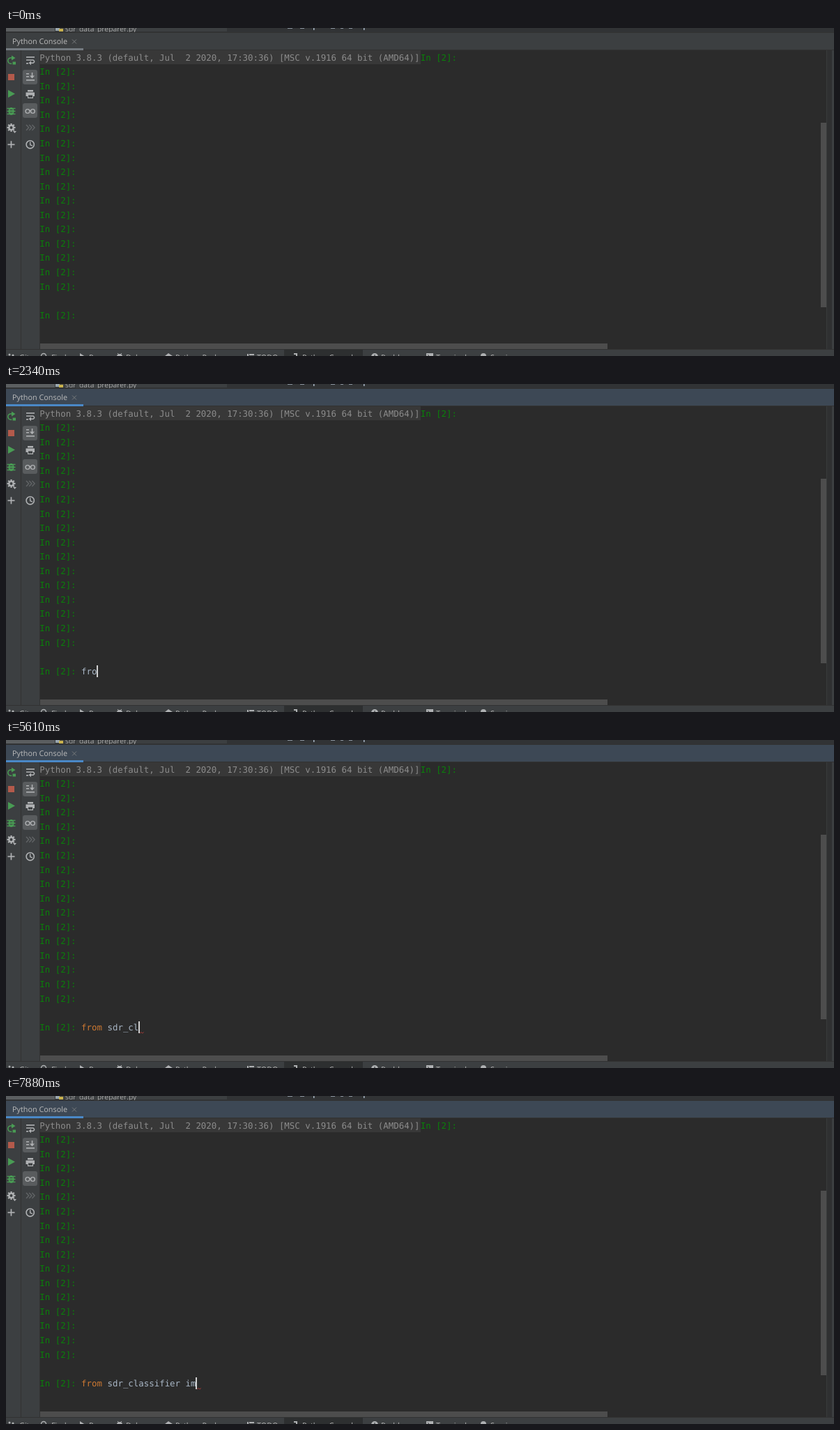
Animation, 1188 px wide and 471 px high, one loop 8 s. Source, as an HTML page with a canvas:

```html
<!DOCTYPE html>
<html lang="en">
<head>
<meta charset="utf-8">
<title>Python Console</title>
<style>
  html, body { margin: 0; width: 100%; height: 100%; overflow: hidden; background: #2b2b2b; }
  canvas { display: block; }
</style>
</head>
<body>
<canvas id="stage" width="1188" height="471"></canvas>
<script>
const ctx = document.getElementById('stage').getContext('2d');
const LOOP = 8000;
const LEFT = 48.3, CHAR = 7.475, ROW = 20.56, BASE = 46.6;
const MONO = '12.417px "DejaVu Sans Mono", monospace';
const UI = '"Open Sans", sans-serif';
const PANEL = '#3c3f41', CONSOLE = '#2b2b2b', LINE = '#323232', ICON = '#afb1b3';
const GREEN = '#499c54', PROMPT = '#0a800a', KEYWORD = '#cc7832', PLAIN = '#a9b7c6';

const COMMAND = 'from sdr_classifier im';
// Time at which each character of the command is typed
const KEYS = [2070, 2270, 2340, 2540, 2610, 3680, 3750, 4020, 4350, 4880, 5610,
  5940, 6140, 6340, 6940, 7070, 7200, 7270, 7420, 7550, 7680, 7880];
// Mouse positions: time, x, y
const MOUSE = [[200, 965, 454], [270, 880, 433], [340, 775, 406], [410, 709, 386],
  [480, 689, 380], [680, 689, 384], [740, 689, 391], [810, 688, 398],
  [870, 688, 403.5], [1340, 688, 404.5]];

function rect(x, y, w, h, color) {
  ctx.fillStyle = color;
  ctx.fillRect(x, y, w, h);
}

function text(str, x, y, color, font) {
  ctx.font = font;
  ctx.fillStyle = color;
  ctx.fillText(str, x, y);
}

function poly(points, color, width = 0) {
  ctx.beginPath();
  points.forEach(([x, y]) => ctx.lineTo(x, y));
  if (width) {
    ctx.strokeStyle = color;
    ctx.lineWidth = width;
    ctx.stroke();
  } else {
    ctx.fillStyle = color;
    ctx.fill();
  }
}

function arc(x, y, r, color, width = 0, from = 0, to = 2 * Math.PI) {
  ctx.beginPath();
  ctx.arc(x, y, r, from, to);
  ctx.strokeStyle = ctx.fillStyle = color;
  ctx.lineWidth = width;
  if (width) ctx.stroke(); else ctx.fill();
}

const cell = n => LEFT + CHAR * n;
const mono = (str, col, row, color) =>
  text(str, cell(col), Math.round(BASE + ROW * row), color, MONO);

function drawEditorEdge() {
  rect(0, 0, 1188, 7, '#313335');
  rect(0, 0, 317, 5, PANEL);
  rect(0, 0, 70, 5, '#5b5e60');
  ctx.save();
  ctx.beginPath();
  ctx.rect(0, 0, 1188, 6);
  ctx.clip();
  rect(71, 0, 6, 4, '#9aa7b0');
  rect(76, 1, 6, 4, '#c9b24e');
  text('sdr_data_preparer.py', 85, 5, '#a8a8a8', '10.3px ' + UI);
  ctx.restore();
  [[404, 7], [422, 6], [466, 6], [480, 4], [492, 5]].forEach(([x, w]) => rect(x, 0, w, 1, '#8b949e'));
  rect(441, 0, 1.5, 3, PLAIN);
  rect(513, 0, 1.5, 3, PLAIN);
  rect(0, 6, 1188, 1, LINE);
}

function drawHeader(active) {
  rect(0, 7, 1188, 24, active ? '#3d4855' : PANEL);
  rect(0, 31, 1188, 1, LINE);
  rect(0, 29, 111, 3, active ? '#4a88c7' : '#747a80');
  text('Python Console', 9, 23, '#bbbbbb', '10.83px ' + UI);
  poly([[95, 16.5], [101, 22.5]], '#777a7c', 1);
  poly([[101, 16.5], [95, 22.5]], '#777a7c', 1);
}

function drawRunIcons() {
  arc(7, 47, 4.2, GREEN, 1.6, 1.3, 5);
  poly([[8, 39.5], [13.5, 43], [8, 46.5]], GREEN);
  rect(9.5, 48.5, 4.5, 4, GREEN);
  rect(3, 66, 9, 9, '#b35a4b');
  poly([[3, 89], [13, 94.5], [3, 100]], GREEN);

  [115.5, 119.5, 123.5].forEach(y => rect(1.5, y - 0.7, 12, 1.4, GREEN));
  ctx.beginPath();
  ctx.ellipse(7.5, 119.5, 4, 5.5, 0, 0, 7);
  ctx.fillStyle = GREEN;
  ctx.fill();
  rect(5.5, 117, 4, 1, PANEL);
  rect(5.5, 120.5, 4, 1, PANEL);

  for (let i = 0; i < 8; i++) {
    const a = i * Math.PI / 4, c = Math.cos(a), s = Math.sin(a);
    poly([[7.5 + 3 * c, 143 + 3 * s], [7.5 + 6 * c, 143 + 6 * s]], ICON, 2.2);
  }
  arc(7.5, 143, 3.2, ICON, 2.4);
  poly([[10, 148], [15, 148], [12.5, 151]], ICON);

  rect(2.5, 166.5, 10, 1.7, ICON);
  rect(6.6, 162.3, 1.7, 10, ICON);
}

function drawConsoleIcons() {
  for (const y of [60, 108]) {
    ctx.beginPath();
    ctx.roundRect(24, y, 21, 21, 3);
    ctx.fillStyle = '#595c5e';
    ctx.fill();
  }
  rect(29, 41, 12, 1.6, ICON);
  poly([[29, 46], [39, 46], [40.5, 47.5], [40.5, 49], [39, 50.3], [35, 50.3]], ICON, 1.5);
  poly([[36, 47.2], [36, 53.2], [32.5, 50.2]], ICON);
  rect(29, 50, 3, 1.6, ICON);

  rect(29, 65, 4, 1.5, ICON);
  rect(29, 69, 4, 1.5, ICON);
  rect(29, 74, 12, 1.6, ICON);
  rect(36.8, 64, 1.5, 6, ICON);
  poly([[34, 68.5], [41, 68.5], [37.5, 72.3]], ICON);

  rect(31, 89, 8, 2.5, ICON);
  rect(28.5, 92.5, 12.5, 5.5, ICON);
  rect(31, 95.5, 8, 5.5, ICON);
  rect(32, 96.5, 6, 3.2, PANEL);

  arc(31, 119.5, 2.9, ICON, 1.4);
  arc(38.4, 119.5, 2.9, ICON, 1.4);
  rect(33.5, 118, 2.5, 1.2, ICON);

  [29, 33.2, 37.4].forEach(x =>
    poly([[x, 139], [x + 3.7, 143], [x, 147]], '#606365', 1.5));

  arc(34.7, 167.3, 5.6, ICON, 1.6);
  poly([[34.7, 163.5], [34.7, 167.8], [37.8, 169]], ICON, 1.4);
}

function drawSideBars() {
  rect(0, 32, 48, 429, PANEL);
  rect(21, 32, 1, 429, LINE);
  rect(48, 32, 1, 429, LINE);
  drawRunIcons();
  drawConsoleIcons();
}

function drawBottomBar() {
  rect(0, 461, 1188, 10, PANEL);
  rect(0, 461, 1188, 1, LINE);
  rect(399, 462, 113, 9, '#2d2f30');
  const tabs = [['Git', 19], ['Find', 65], ['Run', 119], ['Debug', 172],
    ['Python Packages', 243], ['TODO', 360], ['Python Console', 425],
    ['Problems', 538], ['Terminal', 617], ['Services', 695]];
  for (const [label, x] of tabs) text(label, x, 477, '#bbbbbb', '10.83px ' + UI);

  arc(5, 469, 1.5, ICON);
  arc(10, 470, 1.5, ICON);
  arc(54, 471, 3.5, ICON, 1.5);
  poly([[106, 467], [113, 471.5], [106, 476]], ICON);
  arc(163, 472, 4, ICON);
  poly([[160, 467], [163, 470], [166, 467]], ICON, 1);
  poly([[228, 471], [233, 467], [239, 471]], ICON);
  rect(346, 468, 2, 3, ICON);
  rect(349, 468, 7, 2, ICON);
  poly([[413, 468], [417, 468], [417, 471]], ICON, 2);
  arc(529, 472, 5, ICON);
  rect(528.4, 469, 1.2, 2, PANEL);
  rect(603, 467, 10, 4, ICON);
  poly([[605, 469], [607, 471]], PANEL, 1);
  arc(685, 471, 4, ICON);
}

function drawConsole() {
  rect(49, 32, 1139, 429, CONSOLE);
  rect(49, 32, cell(73) - 48, 20, '#383838');
  mono('Python 3.8.3 (default, Jul  2 2020, 17:30:36) [MSC v.1916 64 bit (AMD64)]', 0, 0, '#8c8c8c');
  mono('In [2]:', 73.1, 0, PROMPT);
  for (let row = 1; row <= 18; row++) {
    if (row !== 17) mono('In [2]:', 0, row, PROMPT);
  }
  rect(1169, 136, 8, 265, '#4d4d4d');
  rect(49, 453, 814, 8, '#4d4d4d');
  rect(1177, 32, 1, 429, '#393b3c');
  rect(1178, 32, 7, 429, '#2f3031');
  rect(1185, 32, 3, 429, PANEL);
}

function drawSquiggle(x) {
  const points = [];
  for (let i = 0; i <= 4; i++) points.push([x + i * 1.8, i % 2 ? 421.2 : 419.4]);
  poly(points, '#a83c38', 1);
}

function drawCommand(t) {
  if (t < 1070) return;
  const typed = KEYS.filter(k => t >= k).length;
  const shown = COMMAND.slice(0, typed);
  mono(shown.slice(0, 4), 8, 18, typed >= 4 ? KEYWORD : PLAIN);
  mono(shown.slice(5), 13, 18, PLAIN);
  if (t >= 2940) drawSquiggle(cell(t < 4480 ? 12 : 8 + typed));
  rect(Math.floor(cell(8 + typed)), 404, 2, 17, '#d0d0d0');
}

function drawMouse(t) {
  if (t < 200 || t >= 2070) return;
  const [, x, y] = MOUSE.filter(m => t >= m[0]).pop();
  if (t >= 1070 && t < 1140) arc(685.5, 403, 11, '#8e8e16');
  const top = Math.floor(y - 7), left = x - 3;
  for (const row of [top, top + 14]) {
    rect(left, row, 3, 1, '#d4d4d4');
    rect(left + 4, row, 3, 1, '#d4d4d4');
  }
  rect(x, top + 1, 1, 13, '#d4d4d4');
}

function draw(t) {
  drawEditorEdge();
  drawHeader(t >= 1140);
  drawConsole();
  drawSideBars();
  // The tab underline overlaps the top of the side bars' border
  drawBottomBar();
  drawCommand(t);
  drawMouse(t);
}

const start = performance.now();
function tick() {
  draw((performance.now() - start) % LOOP);
  requestAnimationFrame(tick);
}
ctx.textRendering = 'geometricPrecision';
tick();
</script>
</body>
</html>
```
